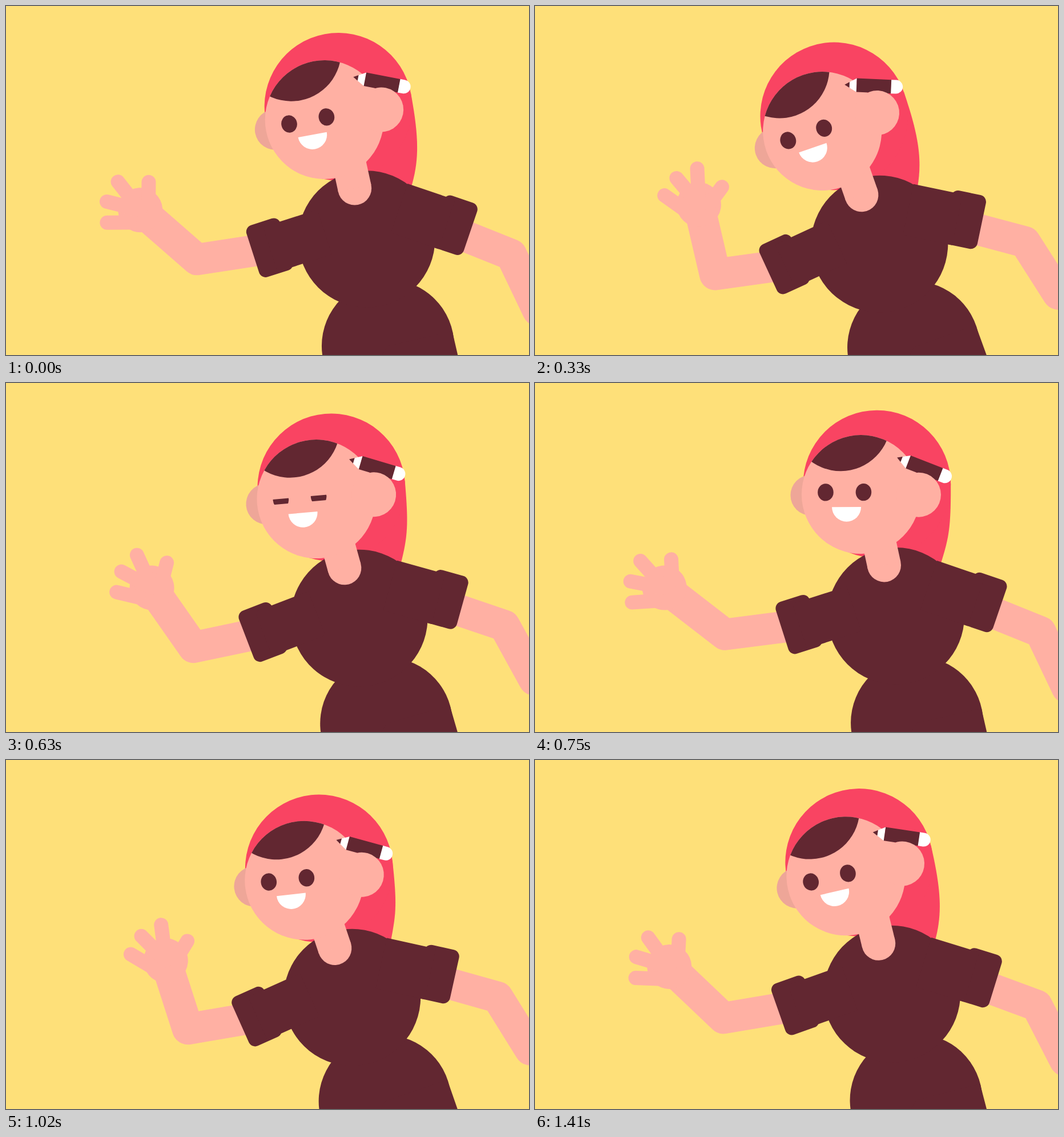
An HTML page for the animation above (1440 ms loop, 916 by 611 pixels).

```html
<!DOCTYPE html>
<html lang="en">
<head>
<meta charset="utf-8">
<title>Waving</title>
<style>
  html, body { margin: 0; width: 100%; height: 100%; overflow: hidden; background: #fee079; }
  svg { display: block; width: 100%; height: 100%; }
  .pink { fill: #f94462; }
  .dark { fill: #622731; }
  .skin { fill: #ffb0a3; }
  .white { fill: #fff; }
  .limb { fill: none; stroke: #ffb0a3; stroke-linejoin: round; }
</style>
</head>
<body>
<svg viewBox="0 0 916 611" preserveAspectRatio="none">
  <defs>
    <clipPath id="face"><circle r="104"/></clipPath>
    <clipPath id="lids"><rect id="lid" x="-90" width="130"/></clipPath>
  </defs>

  <path id="tail" class="pink"/>
  <g id="hood"><circle class="pink" cx="28" cy="-18" r="129.3"/></g>

  <polyline id="arm" class="limb" stroke-width="55"/>
  <g id="hand">
    <circle class="skin" r="39"/>
    <path class="limb" stroke-width="25" stroke-linecap="round"
      d="M46.5-21L18.5 3M11.5-62L0 0M-27.5-54L0 0M-55-29.4L-29 0"/>
  </g>

  <g id="body">
    <path class="limb" stroke-width="55" stroke-linecap="round" d="M792 398L885 435.4L931.7 533"/>
    <g class="dark">
      <circle cx="669" cy="595" r="116"/>
      <path d="M669 595L781.7 569.5L811.7 700H600Z"/>
      <circle cx="631.8" cy="408" r="119.9"/>
      <g transform="translate(462 423) rotate(-17.8)">
        <rect x="-31" y="-47.6" width="62" height="95.2" rx="12"/>
        <rect y="-38" width="100" height="82.5"/>
      </g>
      <g transform="translate(784.6 383.5) rotate(18.8)">
        <rect x="-31" y="-47.6" width="62" height="96" rx="12"/>
        <rect x="-100" y="-42.5" width="88" height="90.9"/>
      </g>
    </g>
    <circle class="skin" cx="611" cy="319" r="29.5"/>
    <path class="limb" stroke-width="59" d="M611 319L594 241"/>
  </g>

  <g id="head">
    <circle cx="-88" cy="1" r="35.5" fill="#eea698"/>
    <circle class="skin" r="104"/>
    <circle class="dark" cx="-35" cy="-128.5" r="87.5" clip-path="url(#face)"/>
    <g clip-path="url(#lids)" class="dark">
      <ellipse cx="-62" cy="-4" rx="13.8" ry="15.2"/>
      <ellipse cx="4.5" cy="-4" rx="13.8" ry="15.2"/>
    </g>
    <path class="white" d="M-51 22H0A25.5 25.5 0 0 1-51 22Z"/>
    <g transform="translate(83 -56.5) rotate(21.5)">
      <path class="white" d="M0-12L-12.5-5V5L0 12ZM60-12H69A12 12 0 0 1 69 12H60Z"/>
      <path class="dark" d="M0-12H60.5V12H0ZM-21 0L-12.5-5V5Z"/>
    </g>
    <circle class="skin" cx="101" cy="1" r="39"/>
  </g>
</svg>
<script>
const LOOP = 1440, STEP = 30;
const HIP = [688.5, 645];
const $ = id => document.getElementById(id);

// cosine easing from one turning point to the next; values repeat in order
function sway(n, turns, values) {
  let i = 0;
  while (n >= turns[i + 1]) i++;
  const from = values[i % values.length], to = values[(i + 1) % values.length];
  const p = (n - turns[i]) / (turns[i + 1] - turns[i]);
  return from + (to - from) * (1 - Math.cos(Math.PI * p)) / 2;
}

// angles in degrees at a step of the loop
const lean = n => sway(n, [-11, 1.5, 14.5, 26, 38, 51], [8.45, -.25]);
const wave = n => sway(n, [-10, 2.5, 14, 26.2, 38, 50], [5.5, 53.5]);
const tilt = n => sway(n, [0, 10, 27, 42.5, 52], [10.6, 19.2, -.4, 15.2, 10.6]);
const eyesOpen = n => Math.min(1, .25 + .2 * (n - 21.5) ** 2);

// counter-clockwise turn in degrees
function turn([x, y], deg) {
  const a = deg * Math.PI / 180, c = Math.cos(a), s = Math.sin(a);
  return [x * c + y * s, y * c - x * s];
}
const add = (p, q) => [p[0] + q[0], p[1] + q[1]];
const place = (id, p, deg) => $(id).setAttribute('transform', `translate(${p}) rotate(${-deg})`);

function draw(n) {
  const bend = lean(n), nod = tilt(n), fore = wave(n);
  const onBody = (x, y) => add(HIP, turn([x - HIP[0], y - HIP[1]], bend));
  $('body').setAttribute('transform', `rotate(${-bend} ${HIP})`);

  const center = add(onBody(584.7, 265.2), turn([-14, -70], nod));
  const onHead = (x, y) => add(center, turn([x, y], nod));
  place('head', center, nod);
  place('hood', center, nod);
  $('tail').setAttribute('d', `M${onHead(157.3, -18)}C${onHead(157.3, 62)} ${onBody(724, 271)} `
    + `${onBody(710, 317)}L${onBody(640, 350)} ${onHead(28, -18)}Z`);

  // the arm stretches as it opens
  const stretch = 8 * (fore / 52) ** 4;
  const rise = 12 - .0115 * (fore - 32) ** 2;
  const shoulder = onBody(462.5, 424);
  const elbow = add(shoulder, turn([-123 - stretch, 0], rise));
  const palm = add(elbow, turn([0, -125.5 - stretch], fore));
  $('arm').setAttribute('points', `${shoulder} ${elbow} ${palm}`);
  place('hand', palm, fore);

  const open = eyesOpen(n);
  $('lid').setAttribute('y', -19.5 * open);
  $('lid').setAttribute('height', 31 * open);
}

function tick(now) {
  draw(Math.floor(now % LOOP / STEP));
  requestAnimationFrame(tick);
}
draw(0);
requestAnimationFrame(tick);
</script>
</body>
</html>
```
